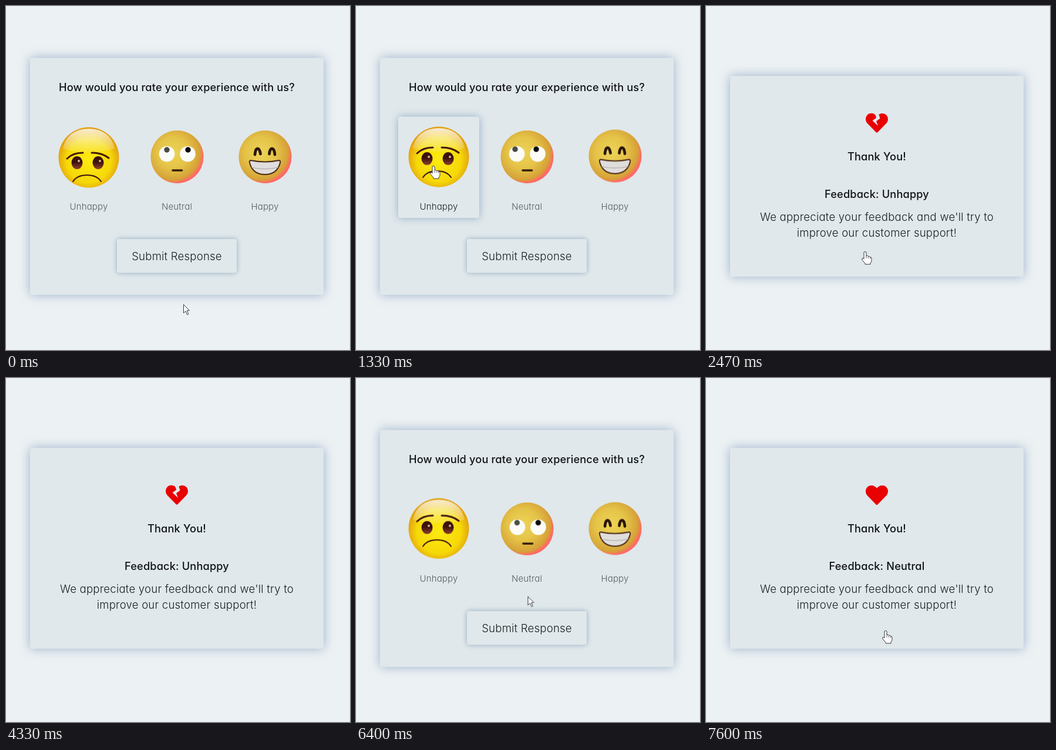
Recreate the animation shown at these times as an HTML page. Size 586 by 586 pixels, loop 8000 ms.

```html
<!DOCTYPE html>
<html lang="en">
<head>
<meta charset="utf-8">
<title>Feedback form</title>
<style>
  html, body { margin: 0; width: 100%; height: 100%; overflow: hidden; background: #ecf1f3; }
  svg { display: block; width: 100vw; height: 100vh; }

  text {
    font: 300 18.6px Inter, "Open Sans", sans-serif;
    font-feature-settings: "cv11";
    letter-spacing: .2px;
    text-anchor: middle;
    fill: #1c2022;
  }
  .title { font-weight: 450; font-size: 18.2px; letter-spacing: .15px; fill: #101214; }
  .label { font-size: 15px; letter-spacing: .15px; opacity: .7; }

  .card, .button, .cell rect { fill: #e0e8eb; }
  .card { filter: drop-shadow(0 0 9px rgba(95, 130, 175, .58)); }
  .button { filter: drop-shadow(0 0 4px rgba(90, 125, 160, .6)); }
  .cell rect { opacity: var(--on); filter: drop-shadow(0 0 7px rgba(95, 130, 175, .58)); }
  .cell text { opacity: calc(.7 + .3 * var(--on)); }
  .cell { --on: 0; }

  /* Hard switches */
  .form, .bare, .thanks, .sad, .glad, .arrow, .hand, .cell, .cursor { animation: 8s step-end infinite; }
  .form { animation-name: form; }
  .bare { animation-name: bare; }
  .thanks { animation-name: thanks; }
  .sad { animation-name: sad; }
  .glad { animation-name: glad; }
  .first { animation-name: first; }
  .second { animation-name: second; }
  .arrow { animation-name: arrow; }
  .hand { animation-name: hand; }
  .cursor { animation-name: shown; }

  @keyframes form { 0%, 75.875% { opacity: 1 } 30.875%, 95%, 100% { opacity: 0 } }
  @keyframes bare { 0%, 75.875%, 100% { opacity: 0 } 73.375% { opacity: 1 } }
  @keyframes thanks { 0%, 73.375% { opacity: 0 } 30.875%, 95%, 100% { opacity: 1 } }
  @keyframes sad { 0% { opacity: 1 } 73.375%, 100% { opacity: 0 } }
  @keyframes glad { 0% { opacity: 0 } 73.375%, 100% { opacity: 1 } }
  @keyframes first { 0%, 50%, 100% { --on: 0 } 11.625% { --on: 1 } }
  @keyframes second { 0% { --on: 0 } 80.625%, 100% { --on: 1 } }
  @keyframes arrow {
    0%, 8.75%, 21.625%, 45%, 78.75%, 90% { opacity: 1 }
    4.6%, 11.625%, 25.2%, 77%, 80.625%, 91.2%, 100% { opacity: 0 }
  }
  @keyframes hand {
    0%, 8.75%, 21.625%, 45%, 78.75%, 90% { opacity: 0 }
    4.6%, 11.625%, 25.2%, 77%, 80.625%, 91.2%, 100% { opacity: 1 }
  }
  @keyframes shown { 0%, 49.125%, 59.125%, 100% { opacity: 1 } 46.625%, 54.125% { opacity: 0 } }

  /* Movement */
  .pointer { animation: point 8s linear infinite; }
  .lift { animation: lift 8s ease-in-out infinite; }
  .droop { animation: droop 8s ease-in-out infinite; }
  .brows { animation: brows 8s ease-in-out infinite; }
  .look { animation: look 8s ease-in-out infinite; }
  .gaze { animation: gaze 8s ease-in-out infinite; }
  .laugh { animation: laugh 8s ease-in-out infinite; }

  @keyframes point {
    0%, .875% { transform: translate(302px, 508px) }
    8.75% { transform: translate(222px, 398px) }
    11.625% { transform: translate(194px, 358px) }
    15%, 17.5% { transform: translate(132px, 272px) }
    21.625% { transform: translate(185px, 364px) }
    26.6% { transform: translate(262px, 410px) }
    30%, 44.99% { transform: translate(271px, 418px) }
    45%, 46.625% { transform: translate(278px, 402px) }
    49.12%, 49.99% { transform: translate(347px, 346px) }
    50%, 52.49% { transform: translate(342px, 290px) }
    52.5%, 54.125% { transform: translate(358px, 304px) }
    59.125% { transform: translate(326px, 416px) }
    61.625%, 63.375% { transform: translate(262px, 458px) }
    67.5%, 75.875% { transform: translate(266px, 442px) }
    78.75% { transform: translate(285px, 396px) }
    80.625% { transform: translate(296px, 360px) }
    85.875%, 88.1% { transform: translate(310px, 300px) }
    91.25% { transform: translate(308px, 400px) }
    93.75%, 100% { transform: translate(306px, 430px) }
  }
  @keyframes lift {
    0%, 95%, 100% { transform: none }
    16.625%, 75.875% { transform: translateY(-1px) }
    30.875%, 85.875% { transform: translateY(-3px) }
  }
  @keyframes droop {
    0%, 95%, 100% { transform: none }
    16.625%, 75.875% { transform: translateY(-6px) }
    30.875% { transform: translateY(-15px) }
    85.875% { transform: translateY(-19px) }
  }
  @keyframes brows {
    0%, 95%, 100% { transform: none }
    16.625%, 75.875% { transform: translateY(-2px) }
    30.875%, 85.875% { transform: translateY(-6px) }
  }
  @keyframes look {
    0%, 16.625%, 75.875%, 95%, 100% { transform: none }
    30.875%, 85.875% { transform: translate(2.5px, 6px) }
  }
  @keyframes gaze {
    0%, 95%, 100% { transform: none }
    16.625%, 75.875% { transform: translate(-3px, -1px) }
    30.875%, 85.875% { transform: translate(4px, 0) }
  }
  @keyframes laugh {
    0%, 30.875%, 75.875%, 95%, 100% { transform: none }
    16.625%, 85.875% { transform: translateY(-1.5px) }
  }
</style>
</head>
<body>
<svg viewBox="0 0 586 586">
  <defs>
    <radialGradient id="ball" cx=".42" cy=".42" r=".58">
      <stop offset="0" stop-color="#ecd459"/>
      <stop offset=".5" stop-color="#e5c448"/>
      <stop offset=".88" stop-color="#d6a238"/>
      <stop offset=".95" stop-color="#ef8050"/>
      <stop offset="1" stop-color="#ff6868"/>
    </radialGradient>
    <radialGradient id="lemon" cx=".5" cy=".55" r=".52">
      <stop offset="0" stop-color="#fdea10"/>
      <stop offset=".7" stop-color="#f6d908"/>
      <stop offset="1" stop-color="#e2a012"/>
    </radialGradient>
    <linearGradient id="gloss" x2="0" y2="1">
      <stop offset="0" stop-color="#fff" stop-opacity=".8"/>
      <stop offset="1" stop-color="#fff" stop-opacity=".08"/>
    </linearGradient>
    <linearGradient id="iris" x2="0" y2="1">
      <stop offset=".45" stop-color="#3b120c"/>
      <stop offset="1" stop-color="#8f4030"/>
    </linearGradient>
    <g id="sadEye">
      <ellipse rx="9.5" ry="11" fill="url(#iris)"/>
      <circle cx="3" cy="-3" r="2" fill="#d9b3a0"/>
    </g>
    <g id="submit">
      <rect class="button" x="189" y="397" width="204" height="57.5" rx="4"/>
      <text x="291" y="432.5">Submit Response</text>
    </g>
  </defs>

  <rect x="585" width="1" height="586" fill="#e2e6e8"/>

  <g class="form">
    <rect class="card" x="41" y="88.5" width="500" height="403.5" rx="4"/>
    <text class="title" x="291" y="145">How would you rate your experience with us?</text>

    <g class="cell first">
      <rect x="72" y="188.5" width="138" height="172.5" rx="4"/>
      <text class="label" x="141" y="346.5">Unhappy</text>
    </g>
    <g class="cell second">
      <rect x="222" y="188.5" width="138" height="172.5" rx="4"/>
      <text class="label" x="291" y="346.5">Neutral</text>
    </g>
    <text class="label" x="441" y="346.5">Happy</text>

    <g class="lift">
      <circle cx="141" cy="258" r="51.5" fill="url(#lemon)"/>
      <path d="M97 243Q104 210 141 209Q178 210 185 243Q141 257 97 243Z" fill="url(#gloss)"/>
      <g class="droop" fill="none" stroke="#43180c" stroke-linecap="round">
        <g class="brows">
          <path d="M104 260Q114 250 131 250M146 250Q164 250 175 259" stroke-width="3"/>
        </g>
        <use href="#sadEye" x="121" y="267" stroke="none"/>
        <use href="#sadEye" x="157" y="267" stroke="none"/>
        <path d="M114 299Q121 288 138 288Q155 288 162 299" stroke-width="2"/>
      </g>
    </g>

    <circle cx="291.5" cy="257" r="45" fill="url(#ball)"/>
    <g class="look">
      <g fill="#fbfbf7">
        <circle cx="274" cy="252" r="13.3"/>
        <circle cx="309.5" cy="252" r="13.3"/>
      </g>
      <g class="gaze">
        <circle cx="274" cy="245" r="4.7" fill="#4a4a46"/>
        <circle cx="310" cy="245" r="4.7" fill="#0c0b08"/>
      </g>
      <path d="M284 280H299.5" stroke="#33200c" stroke-width="3.6" stroke-linecap="round"/>
    </g>

    <g class="laugh">
      <circle cx="441.5" cy="257" r="45" fill="url(#ball)"/>
      <path d="M424 253Q425 243 428.5 243Q432 243 433.5 252M448.5 252Q449.5 243 453 243Q457 243 458 253"
            fill="none" stroke="#2b1708" stroke-width="4.8" stroke-linecap="round"/>
      <path d="M417 263Q441 268 465 263Q468 263 467 267Q462 287 441 287Q420 287 415 267Q414 263 417 263Z"
            fill="#e0dddd" stroke="#4a2a18" stroke-width="2"/>
      <path d="M418 275Q441 280 464 275" fill="none" stroke="#aaa4a2"/>
    </g>

    <use href="#submit"/>
  </g>

  <g class="bare">
    <rect class="card" x="54" y="150.5" width="474" height="279.5" rx="4"/>
    <text class="title" x="291" y="208">How would you rate your experience with us?</text>
    <text class="label" x="217" y="285">Unhappy</text>
    <text class="label" x="300" y="285">Neutral</text>
    <text class="label" x="374" y="285">Happy</text>
    <use href="#submit" y="-62"/>
  </g>

  <g class="thanks">
    <rect class="card" x="41" y="119" width="500" height="342" rx="4"/>
    <text class="title" x="291" y="262.5">Thank You!</text>
    <g class="sad">
      <path d="M289.5 188L287.8 184.8C283 181.6 277.5 182.5 274.5 186C271 190 271.5 196 274.5 199.5L289.5 215Q291 216.5 292.5 215L307.5 199.5C310.500 196 311 190 307.5 186C304 182.3 298.5 182 294.5 184.8L296.500 191.5L290 196.200L293 204L283.5 195.300L290 190.800Z" fill="#e90000"/>
      <text class="title" x="291" y="326.5">Feedback: Unhappy</text>
    </g>
    <g class="glad">
      <path d="M291 187.5C287 182.6 280 181.300 275.5 185.2C271 189 270.8 196 275 200.5L289.3 215.3Q291 217 292.7 215.3L307 200.5C311.2 196 311 189 306.5 185.2C302 181.3 295 182.6 291 187.5Z" fill="#e90000"/>
      <text class="title" x="291" y="326.5">Feedback: Neutral</text>
    </g>
    <text x="291" y="365.5">We appreciate your feedback and we'll try to</text>
    <text x="291" y="392.5">improve our customer support!</text>
  </g>

  <g class="cursor">
    <g class="pointer" fill="#fff" stroke="#33373c" stroke-linejoin="round">
      <path class="arrow" d="M.5 .5V15L4 11.7L6.5 17.8L8.8 16.8L6.3 10.8H10.5Z"/>
      <g class="hand">
        <path d="M-2 13V2Q-2 .5 0 .5Q2 .5 2 2V7.5Q5 6.8 5.5 8.5Q8 8 8.5 9.7Q11 9.3 11 12V15.5Q11 18 9 20V22H0V20.5L-5 14.5Q-6 11.5 -4 11.5Q-3 11.5 -2 13Z"/>
        <path d="M2 7.5V12M5.3 8.5V12M8.4 9.7V12.5" fill="none" stroke-width=".8"/>
      </g>
    </g>
  </g>
</svg>
</body>
</html>
```
